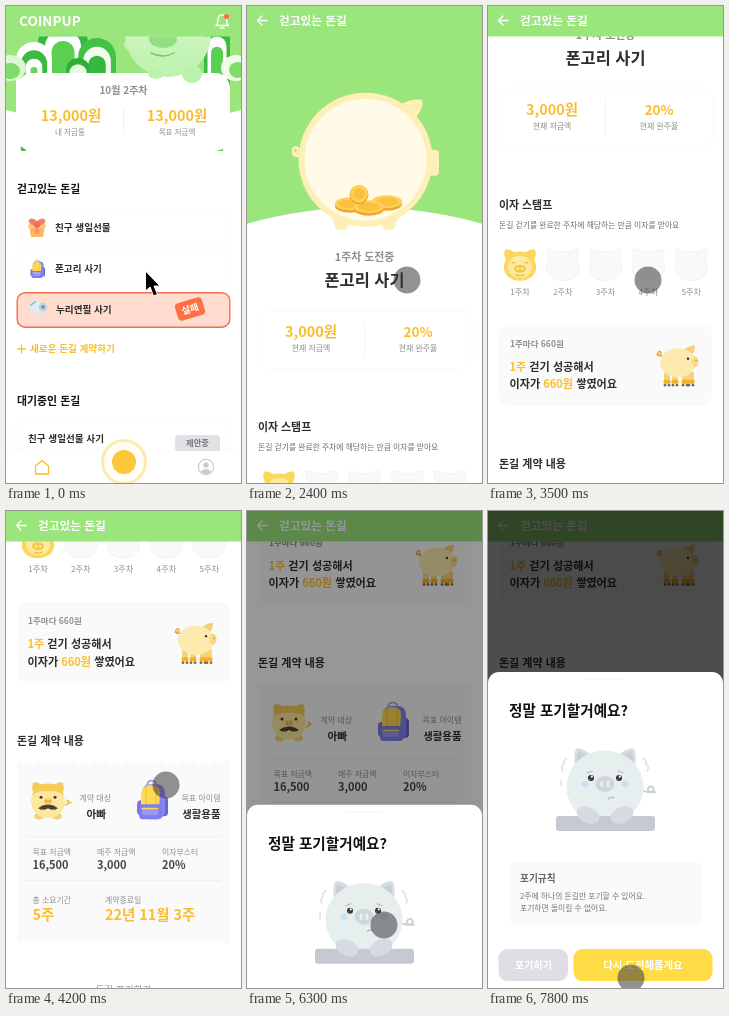
These frames come from a looping animation (235x477 px, 8 s). An HTML page:

```html
<!DOCTYPE html>
<html lang="ko">
<head>
<meta charset="utf-8">
<style>
html,body{margin:0;width:100%;height:100%;overflow:hidden;background:#fff}
svg{display:block;width:100vw;height:100vh}
text{font-family:"Noto Sans CJK KR","Noto Sans CJK JP","Noto Sans",sans-serif;white-space:pre}
.card{filter:drop-shadow(0 0 2px #00000008)}
</style>
</head>
<body>
<svg id="stage" viewBox="0 0 235 477"></svg>
<script>
const GREEN = '#9be57d', GOLD = '#fbbd2c', GRAY = '#8e8e8e', INK = '#2d2d2d', PALE = '#fafafa';

// Drawing helpers; text y is the vertical middle of the line
const text = (x, y, size, str, fill = INK, weight = 700, anchor = 'start', extra = '') =>
  `<text x="${x}" y="${y + size * .36}" font-size="${size}" fill="${fill}" font-weight="${weight}" text-anchor="${anchor}" ${extra}>${str}</text>`;
const mid = (x, y, size, str, fill, weight, extra) => text(x, y, size, str, fill, weight, 'middle', extra);
const note = (x, y, size, str, anchor) => text(x, y, size, str, GRAY, 500, anchor);
const rect = (x, y, w, h, r, fill, extra = '') =>
  `<rect x="${x}" y="${y}" width="${w}" height="${h}" rx="${r}" fill="${fill}" ${extra}/>`;
const oval = (x, y, rx, ry, fill, extra = '') =>
  `<ellipse cx="${x}" cy="${y}" rx="${rx}" ry="${ry}" fill="${fill}" ${extra}/>`;
const dot = (x, y, r, fill, extra) => oval(x, y, r, r, fill, extra);
const shape = (d, fill) => `<path d="${d}" fill="${fill}"/>`;
const line = (d, color, w = 1, extra = '') =>
  `<path d="${d}" fill="none" stroke="${color}" stroke-width="${w}" stroke-linecap="round" stroke-linejoin="round" ${extra}/>`;
const at = (x, y, body, scale = 1) => `<g transform="translate(${x} ${y}) scale(${scale})">${body}</g>`;
const tint = str => `<tspan fill="${GOLD}">${str}</tspan>`;

const backpack =
  line('M-4 -15Q-3 -20 1 -19.500Q6 -19 5 -14', '#9c9ce0', 1.6) +
  rect(-14, 0, 8, 15, 4, '#7776e0') + rect(9, -4, 8, 20, 4, '#6767d4') +
  rect(-9, -16, 23, 35, 8, '#8785f2') +
  shape('M-10 -6Q-9 -15 0 -15Q9 -15 9 -7L8 6H-10Z', '#ffdb55') +
  line('M-5 -13V4M5 -13V4', '#f4c23c', 1.3) +
  rect(-12, 4, 23, 15, 4, '#7f7eee') + rect(-9, 7, 16, 8, 2, '#9a98f6') +
  line('M-9 8.500H7', '#ffd84d', 1.2);

const gift =
  shape('M-8 -2H8L6 9H-6Z', '#ffb566') + rect(-9, -4, 18, 4, 2, '#ffc57e') +
  oval(-4, -6, 4.5, 3, '#f47d68', 'transform="rotate(25 -4 -6)"') +
  oval(4, -6, 4.5, 3, '#f47d68', 'transform="rotate(-25 4 -6)"') +
  dot(0, -3, 3, '#f06d5c') + dot(0, 3, 2.5, '#ff9060');

const gadget =
  oval(-3, -2, 7, 5, '#e4edf3', 'transform="rotate(30 -3 -2)"') + dot(4, -2, 4.5, '#c4d4df') +
  dot(4, -2, 2, '#8095a6') + line('M1 3L-1 7M5 3L6 7', '#dbe6ee', 2.6) + line('M-8 -4L-4 -7', '#7dc2ea', 2);

const skatingPig =
  line('M-16 -10q-5 1-4 -3q2 -3 3 0q0 3-4 2', '#f0a03c', 1.4) +
  [-11, -3, 7, 13].map(x => rect(x - 3, 6, 6, 11, 2, '#f6d27a') + rect(x - 3.5, 14, 7, 4, 1.5, '#f5b02c') +
    dot(x - 2, 19.5, 1.4, '#806c50') + dot(x + 2, 19.5, 1.4, '#806c50')).join('') +
  shape('M6 -16Q13 -21 17 -20Q17 -15 14 -11Z', '#f6ce73') +
  oval(0, -3, 18, 14.5, '#fdeaae') + oval(17, -4, 3.5, 5.5, '#f8d988') +
  dot(10, -7, 1.2, '#3b332b') + dot(18, -5, .9, '#d79f45');

const dadPig =
  line('M16 5q5 -1 4 -4q-2 -2-2 1q1 2 4 0', '#f2b944', 1.2) +
  shape('M-16 -8Q-18 -15 -15 -18Q-9 -18 -6 -14ZM14 -8Q16 -15 13 -18Q7 -18 4 -14Z', '#f4c95f') +
  oval(-10, 16, 5, 3.5, '#f6d374') + oval(8, 16, 5, 3.5, '#f6d374') +
  dot(-1, 1, 17, '#fce79f') +
  shape('M-17 -5Q-14 -17 -1 -16.500Q12 -17 15 -5Q8 -10 -1 -9Q-10 -10 -17 -5Z', '#f7cb54') +
  dot(-8, -3, 1.5, '#49382a') + dot(6, -3, 1.5, '#49382a') +
  oval(-1, 1, 4.5, 3.2, '#f5cd66') + dot(-2.6, 1, .8, '#b98023') + dot(.6, 1, .8, '#b98023') +
  shape('M-1 4.500Q-6 4 -11 8Q-6 11 -1 8Q4 11 9 8Q4 4 -1 4.500Z', '#51402f');

const stampShape = 'M-15 -15Q-9 -16 -6 -12.500Q0 -14 6 -12.500Q9 -16 15 -15Q17 -9 14 -5Q19 4 13 11Q8 16 0 16Q-8 16 -13 11Q-19 4 -14 -5Q-17 -9 -15 -15Z';
const stampPig = shape(stampShape, '#f9d85c') + oval(0, 2, 12, 11, '#fdeaa0') +
  oval(0, 4, 6, 4, '#f5ca48') + dot(-2, 4, 1.1, '#fff3c2') + dot(2, 4, 1.1, '#fff3c2') +
  line('M-8 -2h3M5 -2h3M-4 10Q0 12 4 10', '#eebb36', 1.3);

const coin = (x, y) => oval(x, y + 2.5, 15, 6.5, '#f0a52b') + oval(x, y, 15, 6.5, '#fdd058') + oval(x, y, 11, 4.3, '#fbc040');

const sadPig =
  line('M39 5q8 3 10 -2q-2 -5-6 -1q-1 5 7 4', '#c9cfd5', 1.8) +
  line('M-38 -28q-4 2-3 6q-4 3-1 7M-44 -6v6M38 -28q4 2 3 6q4 3 1 7', '#d4d9de', 1.2) +
  shape('M-30 -20Q-32 -34 -28 -38Q-20 -37 -14 -31ZM30 -20Q32 -34 28 -38Q20 -37 14 -31Z', '#d6dee2') +
  shape('M-28 -24Q-29 -32 -26 -35L-19 -31ZM28 -24Q29 -32 26 -35L19 -31Z', '#c8d1d7') +
  oval(0, 1, 38.5, 36.5, '#e6eeee') +
  line('M-18 -13L-13 -15M13 -15L18 -13', '#b4bcc3', 1.1) +
  [-14, 14].map(x => dot(x, -8, 3, '#3a302f') + dot(x + .8, -9.3, 1.1, '#fff') + dot(x - 1, -6.8, .7, '#c27b6c')).join('') +
  oval(-20, -2, 2.8, 2.4, '#cfe6f8', 'stroke="#a9d2f2" stroke-width=".7"') +
  oval(20, -2, 2.8, 2.4, '#cfe6f8', 'stroke="#a9d2f2" stroke-width=".7"') +
  oval(0, -2, 9.5, 8, '#cfd7dd') + oval(-3, -2, 1.5, 3.5, '#e9eef0') + oval(3, -2, 1.5, 3.500, '#e9eef0') +
  line('M3 13Q6 10 9 12', '#a9b2ba', 1.1) +
  rect(-49, 30, 99, 15, 3, '#c5c9d1') +
  oval(-17, 29, 12, 8, '#d6dbe1', 'transform="rotate(25 -17 29)"') +
  oval(17, 29, 12, 8, '#d6dbe1', 'transform="rotate(-25 17 29)"');

// Nested arches standing on y = 100
const tree = (x, top, w, colors) => colors.map((c, i) => {
  const k = 1 - i * .27, r = w * k / 2;
  return rect(x - r, 100 - (100 - top) * (1 - i * .13), r * 2, 110, r, c);
}).join('');

const home =
  rect(0, 0, 235, 477, 0, '#fff') + shape('M0 0H235V104Q118 136 0 104Z', GREEN) +
  `<g clip-path="url(#below)">` +
  tree(57, 12, 50, ['#36b83e', '#fff', '#5bcf50']) +
  tree(91, 32, 38, ['#45c146', '#f1fdec', '#36b83e']) +
  tree(28, 36, 36, ['#fff', '#3dba42', '#fff', '#6bd35d']) +
  tree(72, 52, 24, ['#2fae39', '#e6fbdd']) +
  oval(4, 62, 16, 13, '#dcf8d0') + oval(4, 65, 10, 8, '#7fdc69') +
  tree(211, 20, 26, ['#3dba42', '#fff', '#5bcf50']) +
  oval(230, 62, 15, 13, '#effce9') + oval(232, 64, 9, 8, '#7fdc69') + '</g>' +
  rect(11, 67, 213, 78, 15, '#fff') +
  `<g clip-path="url(#below)">` + oval(126, 41, 9, 5, '#bdf2ad', 'transform="rotate(25 126 41)"') +
  oval(162, 29, 43, 42, 'url(#mint)') + oval(186, 68, 10, 9, '#bdf2ad') + oval(150, 68, 8, 5, '#bdf2ad') +
  oval(157, 33, 14, 9, '#92de82') + line('M145 47Q157 53 168 47', '#73c768', 1.4) + '</g>' +
  text(13, 15.5, 13.6, 'COINPUP', '#fff', 800) +
  line('M210 19.5Q212 18 212 13.5Q212 9 216 9Q220.500 9 220.500 13.500Q220.500 18 222.500 19.500ZM214.500 22H218', '#fff', 1.4) +
  dot(220.5, 10.5, 2.6, '#ff7048') +
  mid(117.5, 84, 10, '10월 2주차', GRAY) +
  mid(65, 110, 14.4, '13,000원', GOLD, 900) + mid(171, 110, 14.4, '13,000원', GOLD, 900) +
  note(64, 126, 7.6, '내 저금통', 'middle') + note(171, 126, 7.5, '목표 저금액', 'middle') +
  line('M117.500 103V128', '#f0f0f0') +
  text(11, 183, 10.9, '걷고있는 돈길', '#111') +
  rect(11, 204, 213, 35, 9, '#fff', 'class="card"') + rect(11, 245, 213, 35, 9, '#fff', 'class="card"') +
  rect(11.2, 286.7, 212.6, 34.5, 8, '#ffdccd', 'stroke="#f4704a" stroke-width="1.4"') +
  at(31, 222, gift) + at(31, 263, backpack, .47) + at(33, 303, gadget) +
  text(49, 222, 9.6, '친구 생일선물') + text(49, 263, 9.6, '폰고리 사기') + text(50, 303.5, 9.6, '누리연필 사기') +
  `<g transform="rotate(-17 184 303)">${rect(170, 294, 28, 18, 4, '#ff6f43') + mid(184, 303, 9.5, '실패', '#fff')}</g>` +
  line('M11.500 343H19.500M15.500 339V347', GOLD, 1.3) +
  text(24, 342.5, 9.6, '새로운 돈길 계약하기', GOLD) +
  text(11, 395.5, 10.9, '대기중인 돈길', '#111') +
  rect(11, 415, 213, 50, 9, '#fff', 'class="card"') +
  text(22, 433, 9.6, '친구 생일선물 사기') +
  rect(169, 429, 45, 17, 4, '#e2e2e6') + mid(191.5, 437, 8.3, '제안중', '#77777f') +
  rect(0, 445, 235, 50, 14, '#fff', 'class="card"') +
  line('M29.500 460L36 454.500L42.500 460V468H29.500Z', GOLD, 1.3) +
  dot(118, 456, 21.5, '#fffdf4', 'stroke="#fdebad" stroke-width="3"') + dot(118, 456, 12, '#fcc73a') +
  dot(200, 461, 7.6, '#fff', 'stroke="#ccc" stroke-width="1.2"') + dot(200, 459, 2.7, '#ccc') +
  shape('M194.500 466Q200 459.500 205.500 466Q200 470 194.500 466Z', '#ccc');

const scroller =
  shape('M0 -10H235V218Q117.500 185 0 218Z', GREEN) +
  line('M53 150q-7 1-7 -4q0 -5 4 -4q3 2-1 6', '#fdefb5', 3) +
  shape('M155 98Q165 93 175 94Q178 100 169 112Z', '#fdefb5') +
  rect(177, 144, 15, 26, 4, '#fdefb5') +
  shape('M85 212H104L99 224H89ZM132 212H151L147 224H137Z', '#fdefb5') +
  dot(118.500, 154, 67, '#fdefb5') + dot(118.500, 154, 61, '#fffbe8') +
  coin(103, 198) + coin(140, 196) + coin(122, 201) +
  dot(112, 189, 9.5, '#f0a52b') + dot(112, 188, 9, '#fdd058') + dot(112, 188, 6, '#fbc040') +
  mid(117.5, 251, 10.9, '1주차 도전중', GRAY) + mid(117.5, 274.5, 16.4, '폰고리 사기') +
  rect(11, 306, 213, 56, 10, '#fff', 'class="card"') + line('M117.500 316V352', '#f2f2f2') +
  mid(64, 326.5, 14.4, '3,000원', GOLD, 900) + mid(171, 326.5, 13.6, '20%', GOLD, 900) +
  note(64, 342.5, 7.9, '현재 저금액', 'middle') + note(171, 342.5, 7.9, '현재 완주율', 'middle') +
  text(11, 421, 10.9, '이자 스탬프') +
  text(11, 442, 7.8, '돈길 걷기를 완료한 주차에 해당하는 만큼 이자를 받아요', '#6c6c6c', 500) +
  [0, 1, 2, 3, 4].map(i => {
    const x = 32 + i * 42.8;
    return at(x, 481, i ? shape(stampShape, '#f9f9f9') + line(stampShape, '#f0f0f0', .8) : stampPig) +
      note(x, 508, 8.2, i + 1 + '주차', 'middle');
  }).join('') +
  rect(11, 541, 213, 81, 10, PALE) +
  text(22, 560, 8.5, '1주마다 660원', GRAY) +
  text(21.5, 583, 11.1, tint('1주') + ' 걷기 성공해서') +
  text(21.5, 600.5, 11.1, `이자가 ${tint('660원')} 쌓였어요`) + at(190, 582, skatingPig) +
  text(11, 680, 11, '돈길 계약 내용') +
  rect(11, 700, 213, 182, 0, PALE) +
  line('M17 700H224M17 882H224', '#fff', 6, 'stroke-dasharray="0 11"') +
  at(43, 739, dadPig) + at(145, 739, backpack) +
  note(105, 737, 8, '계약 대상', 'end') + text(100, 753.5, 10.6, '아빠', INK, 700, 'end') +
  note(214.5, 737, 8, '목표 아이템', 'end') + text(214.5, 753.5, 10.4, '생활용품', INK, 700, 'end') +
  line('M21 775.500H214M21 819.500H214', '#eeeeee') +
  [[26.5, '목표 저금액', '16,500'], [91, '매주 저금액', '3,000'], [156, '이자부스터', '20%']].map(([x, label, value]) =>
    note(x, 791, 7.9, label) + text(x, 804, 11, value, '#444', 900)).join('') +
  [[26.5, '총 소요기간', '5주'], [99, '계약종료일', '22년 11월 3주']].map(([x, label, value]) =>
    note(x, 839, 7.9, label) + text(x, 854, 14.4, value, GOLD)).join('') +
  mid(117.5, 928, 9.6, '돈길 포기하기', GRAY, 500, 'text-decoration="underline"');

const detail = rect(0, 0, 235, 477, 0, '#fff') + `<g id="scroller">${scroller}</g>` +
  rect(0, 0, 235, 30.5, 0, GREEN) + line('M20 14.500H11M15 10L10.500 14.500L15 19', '#fff', 1.4) +
  text(32, 14.5, 11.7, '걷고있는 돈길', '#fff');

const sheet =
  rect(0, 161, 235, 340, 11, '#fff') + rect(98, 167, 38, 2, 1, '#f8f8f8') +
  text(21, 200, 14.6, '정말 포기할거예요?', '#111') + at(117, 275, sadPig) +
  rect(21, 351, 193, 63, 6, PALE) + text(32, 367.5, 9.7, '포기규칙', '#666') +
  text(32, 385, 7.8, '2주에 하나의 돈길만 포기할 수 있어요.', '#777', 500) +
  text(32, 397, 7.8, '포기하면 돌이킬 수 없어요.', '#777', 500) +
  rect(10.5, 438, 69.5, 32, 9, '#dedee4') + mid(45.5, 454, 10.2, '포기하기', '#fff') +
  rect(85.5, 438, 139, 32, 9, '#ffdc45') + mid(155, 454, 10.4, '다시 도전해볼게요', '#fff');

const $ = id => document.getElementById(id);
$('stage').innerHTML =
  `<defs><clipPath id="below"><path d="M0 30.500H235V145H0Z"/></clipPath>
  <linearGradient id="mint" x2="0" y2="1"><stop stop-color="#d8f8cd"/><stop offset="1" stop-color="#bdf2ad"/></linearGradient></defs>
  <g id="home">${home}</g><g id="detail">${detail}</g>
  ${rect(0, 0, 235, 477, 0, '#000', 'id="shade"')}<g id="sheet">${sheet}</g>
  <path id="arrow" d="M0 0V20L4.600 16L8 25L12 23.400L8.500 15H14.500Z" fill="#000" stroke="#fff"/>
  ${dot(0, 0, 13.5, '#3c3c3c', 'id="touch"')}`;

// Piecewise smooth interpolation over [time, value] keys
function track(t, keys) {
  let i = 0;
  while (i < keys.length - 2 && t > keys[i + 1][0]) i++;
  const [[t0, a], [t1, b]] = keys.slice(i, i + 2);
  const u = Math.min(1, Math.max(0, (t - t0) / (t1 - t0)));
  return a + (b - a) * u * u * (3 - 2 * u);
}
const move = (id, x, y) => $(id).setAttribute('transform', `translate(${x} ${y})`);
const show = (id, on) => $(id).setAttribute('display', on ? 'inline' : 'none');

function draw(t) {
  const slide = Math.min(1, Math.max(0, (t - 1450) / 450));
  move('detail', 235 * (1 - slide) ** 3, 0);
  show('detail', slide > 0);
  show('home', slide < 1);
  move('scroller', 0, -track(t, [[2380, 0], [3320, 220], [3450, 220], [4350, 468], [5300, 528]]));

  const rise = t < 6150 ? 0 : 1 - Math.exp((6150 - t) / 174);
  move('sheet', 0, 316 * (1 - rise));
  $('shade').setAttribute('opacity', rise * .7);
  show('sheet', rise > 0);

  const touching = t >= 1050;
  show('arrow', !touching);
  show('touch', touching);
  move('arrow', track(t, [[0, 139.5], [1000, 160]]), track(t, [[0, 265], [1000, 274]]));
  move('touch', track(t, [[5250, 160], [5950, 137], [7350, 137], [7800, 143]]),
    track(t, [[5250, 274], [5950, 414], [7350, 414], [7800, 467]]));
  $('touch').setAttribute('opacity', t < 1300 ? .45 : .56);
}

const start = performance.now();
(function tick() {
  draw((performance.now() - start) % 8000);
  requestAnimationFrame(tick);
})();
</script>
</body>
</html>
```
